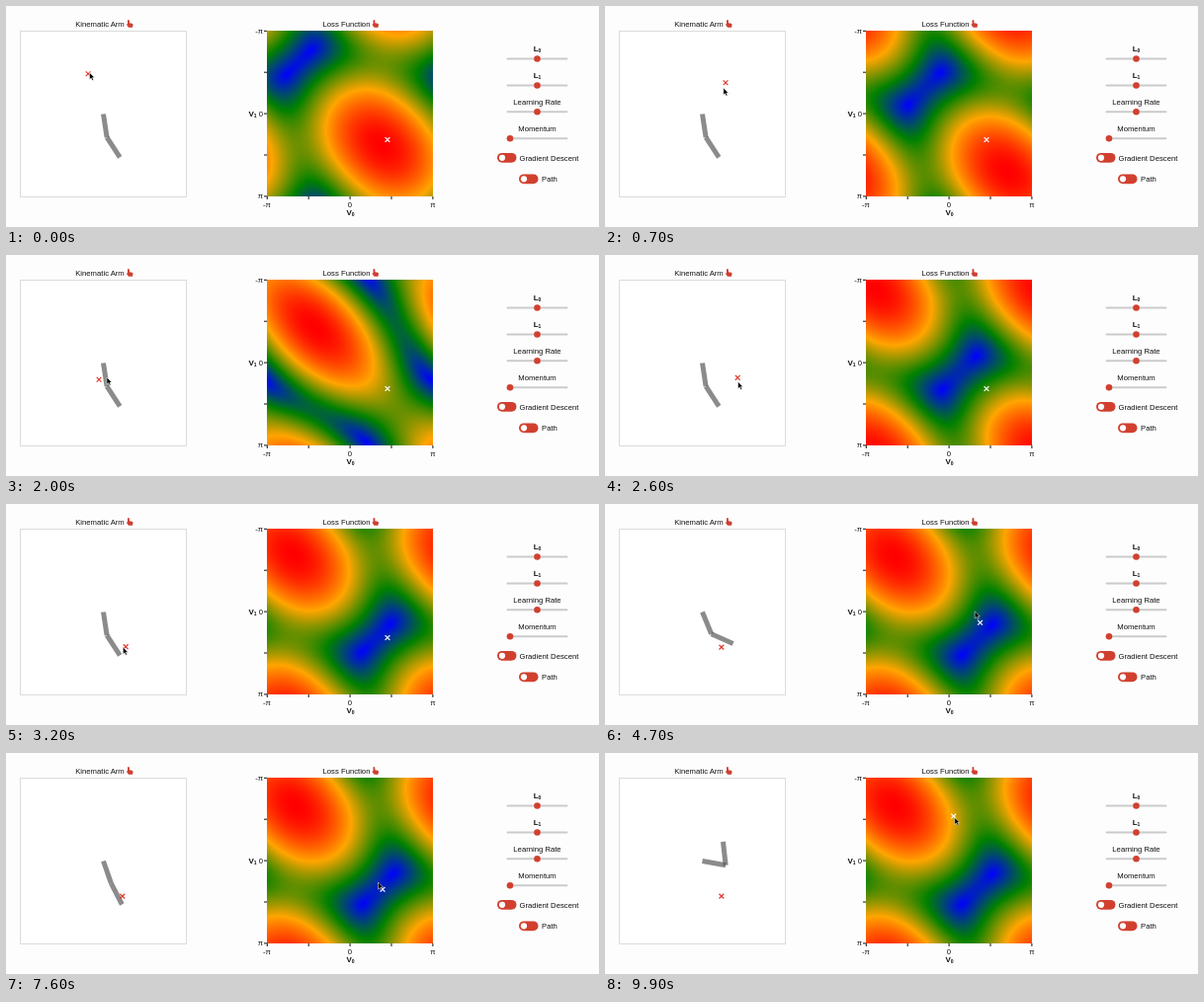
Recreate the animation shown at these times as an HTML page with a canvas. Size 600x224 px, loop 10 s.

```html
<!DOCTYPE html>
<html lang="en">
<head>
<meta charset="utf-8">
<title>Kinematic Arm</title>
<style>
  html, body { margin: 0; width: 100%; height: 100%; overflow: hidden; background: #fdfdfd; }
  canvas, svg { position: absolute; left: 0; top: 0; }
  canvas { left: 264px; top: 25px; }
  text { font: 7.7px "Liberation Sans", Arial, sans-serif; fill: #111; }
  .mid { text-anchor: middle; }
  .end { text-anchor: end; }
  .bold { font-weight: bold; font-size: 8px; }
  .sub { font-size: 5px; }
</style>
</head>
<body>
<canvas id="heat" width="168" height="168"></canvas>
<svg width="600" height="224" viewBox="0 0 600 224">
  <defs>
    <path id="cross" d="M-2.4-2.4 2.4 2.4M2.4-2.4-2.4 2.4" fill="none" stroke-width="1.2"/>
    <path id="hand" d="M1.8 0Q2.9 0 2.9 1V3.2L5.6 3.7Q6.6 4 6.5 5L6 7.8H2L0 5Q0 4 1 4.4V1Q1 0 1.8 0Z" fill="#cf3f30"/>
  </defs>
  <rect x="14.5" y="25.5" width="168" height="168" fill="#fff" stroke="#dcdcdc"/>
  <text class="mid" x="95" y="21">Kinematic Arm</text>
  <text class="mid" x="344.5" y="21">Loss Function</text>
  <use href="#hand" x="122" y="14"/>
  <use href="#hand" x="370.5" y="14"/>
  <g id="axes"></g>
  <g id="controls"></g>
  <g stroke="#5a5a5a" stroke-opacity=".7" stroke-width="5">
    <line id="upper"/>
    <line id="lower"/>
  </g>
  <use id="target" href="#cross" stroke="#e0382c"/>
  <use id="marker" href="#cross" stroke="#fff"/>
  <path id="cursor" d="M0 0V7.1L1.7 5.6 2.8 8.1 4.1 7.5 3 5.1H5.1Z" fill="#000" stroke="#fff" stroke-width=".5"/>
</svg>
<script>
const $ = id => document.getElementById(id);
const LOOP = 10000, STEP = 100, LAG = 85;
const ARM = 24, BASE = { x: 98.5, y: 109.5 }, PLOT = { x: 348, y: 109, half: 84 };
const START = [386, 135.5], DROP = 3300, GRAB = 4500;

// Pointer path: time, x, y
const path = [
  [-100, 83, 69], [0, 84.5, 67.5], [300, 106, 63], [600, 122, 77], [850, 110, 91],
  [1100, 85, 92], [1300, 72, 101.5], [1480, 65, 111], [1650, 70, 122], [1850, 88, 127],
  [2000, 102, 124], [2150, 115, 120], [2450, 133, 122], [2800, 132, 138],
  [3100, 121.5, 144.5], [3400, 121.5, 144.5], [3700, 185, 141], [4100, 345, 133],
  [4400, 386, 135.5], [4500, 385, 134], [4750, 370, 103], [5000, 338, 82], [5250, 302, 110],
  [5450, 283, 161], [5850, 281.5, 172.5], [6100, 282, 172.5], [6550, 308, 165],
  [6850, 345, 167], [7150, 376, 161], [7400, 384, 148], [7600, 376.5, 131], [7850, 358, 115],
  [8200, 352, 120], [8500, 333, 112], [8800, 313, 82], [9150, 302, 54],
  [9500, 325, 47], [9800, 352, 63.5], [10000, 353, 66]
];

function pointer(t) {
  let i = path.findIndex(p => p[0] > t) - 1;
  if (i < 0) i = t < 0 ? 0 : path.length - 2;
  const a = path[i], b = path[i + 1];
  const before = path[i - 1] || a, after = path[i + 2] || b;
  const span = b[0] - a[0], u = (t - a[0]) / span;
  return [1, 2].map(k => {
    const m = (b[k] - before[k]) / (b[0] - before[0]) * span;
    const n = (after[k] - a[k]) / (after[0] - a[0]) * span;
    const d = b[k] - a[k];
    return a[k] + u * (m + u * (3 * d - 2 * m - n + u * (m + n - 2 * d)));
  });
}

const angle = (v, center) => (v - center) / PLOT.half * Math.PI;
const place = (el, [x, y]) => el.setAttribute("transform", `translate(${x} ${y})`);
const ramp = [[0, 0, 255], [0, 128, 0], [255, 165, 0], [255, 0, 0]];
const ctx = $("heat").getContext("2d");
const image = ctx.createImageData(168, 168);

function drawLoss(tx, ty) {
  const max = 2 * ARM + Math.hypot(tx, ty), data = image.data;
  const trig = Array.from({ length: 168 }, (_, i) => {
    const v = (i + 0.5 - 84) / 84 * Math.PI;
    return [ARM * Math.cos(v), ARM * Math.sin(v)];
  });
  let o = 0;
  for (const [cy, sy] of trig) for (const [cx, sx] of trig) {
    const level = 3 * Math.hypot(cx + cy - tx, sx + sy - ty) / max;
    const i = Math.min(2, Math.floor(level)), u = level - i;
    for (let k = 0; k < 3; k++) data[o++] = ramp[i][k] + u * (ramp[i + 1][k] - ramp[i][k]);
    data[o++] = 255;
  }
  ctx.putImageData(image, 0, 0);
}

function setLine(el, x1, y1, x2, y2) {
  Object.entries({ x1, y1, x2, y2 }).forEach(([k, v]) => el.setAttribute(k, v));
}

let lossKey = "";
function render(t) {
  const target = pointer(Math.min(t, DROP) - LAG);
  const marker = t < GRAB ? START : pointer(t - LAG);
  const a = angle(marker[0], PLOT.x), b = angle(marker[1], PLOT.y);
  const ex = BASE.x + ARM * Math.cos(a), ey = BASE.y + ARM * Math.sin(a);
  setLine($("upper"), BASE.x, BASE.y, ex, ey);
  setLine($("lower"), ex, ey, ex + ARM * Math.cos(b), ey + ARM * Math.sin(b));
  place($("target"), target);
  place($("marker"), marker);
  place($("cursor"), pointer(t));
  if (lossKey !== target.join()) {
    lossKey = target.join();
    drawLoss(target[0] - BASE.x, target[1] - BASE.y);
  }
}

const text = (x, y, s, cls = "") => `<text x="${x}" y="${y}" class="${cls}">${s}</text>`;
const indexed = (x, y, c, n) => text(x, y, `${c}<tspan class="sub" dy="1">${n}</tspan>`, "mid bold");

let axes = "";
for (let i = 0; i < 5; i++) {
  const d = i * 41.9;
  axes += `<path d="M261 ${25.3 + d}h3M${264.3 + d} 193v3" stroke="#111"/>`;
}
["-π", "0", "π"].forEach((s, i) => {
  axes += text(260, 28 + i * 83.7, s, "end") + text(264 + i * 84, 203.5, s, "mid");
});
$("axes").innerHTML = axes + indexed(249.5, 112, "V", 1) + indexed(348.5, 212, "V", 0);

const RED = "#d1402f";
const slider = (y, x) => `<rect x="506.5" y="${y - 1}" width="62" height="2" rx="1" fill="#cbcbcb"/>
  <circle cx="${x}" cy="${y}" r="3.3" fill="${RED}"/>`;
const toggle = (x, y) => `<rect x="${x}" y="${y - 4.9}" width="19.5" height="9.8" rx="4.9" fill="${RED}"/>
  <circle cx="${x + 5}" cy="${y}" r="3.1" fill="#fff"/>`;
$("controls").innerHTML =
  indexed(537.5, 46, "L", 0) + slider(53.5, 537.5) +
  indexed(537.5, 73, "L", 1) + slider(80.5, 537.5) +
  text(537.5, 100, "Learning Rate", "mid") + slider(107.3, 537.5) +
  text(537.5, 127, "Momentum", "mid") + slider(134.3, 510) +
  toggle(497, 153.8) + text(519.5, 156.5, "Gradient Descent") +
  toggle(519, 175.3) + text(542, 178, "Path");

const began = performance.now();
function frame() {
  const t = (performance.now() - began) % LOOP;
  render(Math.floor(t / STEP) * STEP);
  requestAnimationFrame(frame);
}
frame();
</script>
</body>
</html>
```
